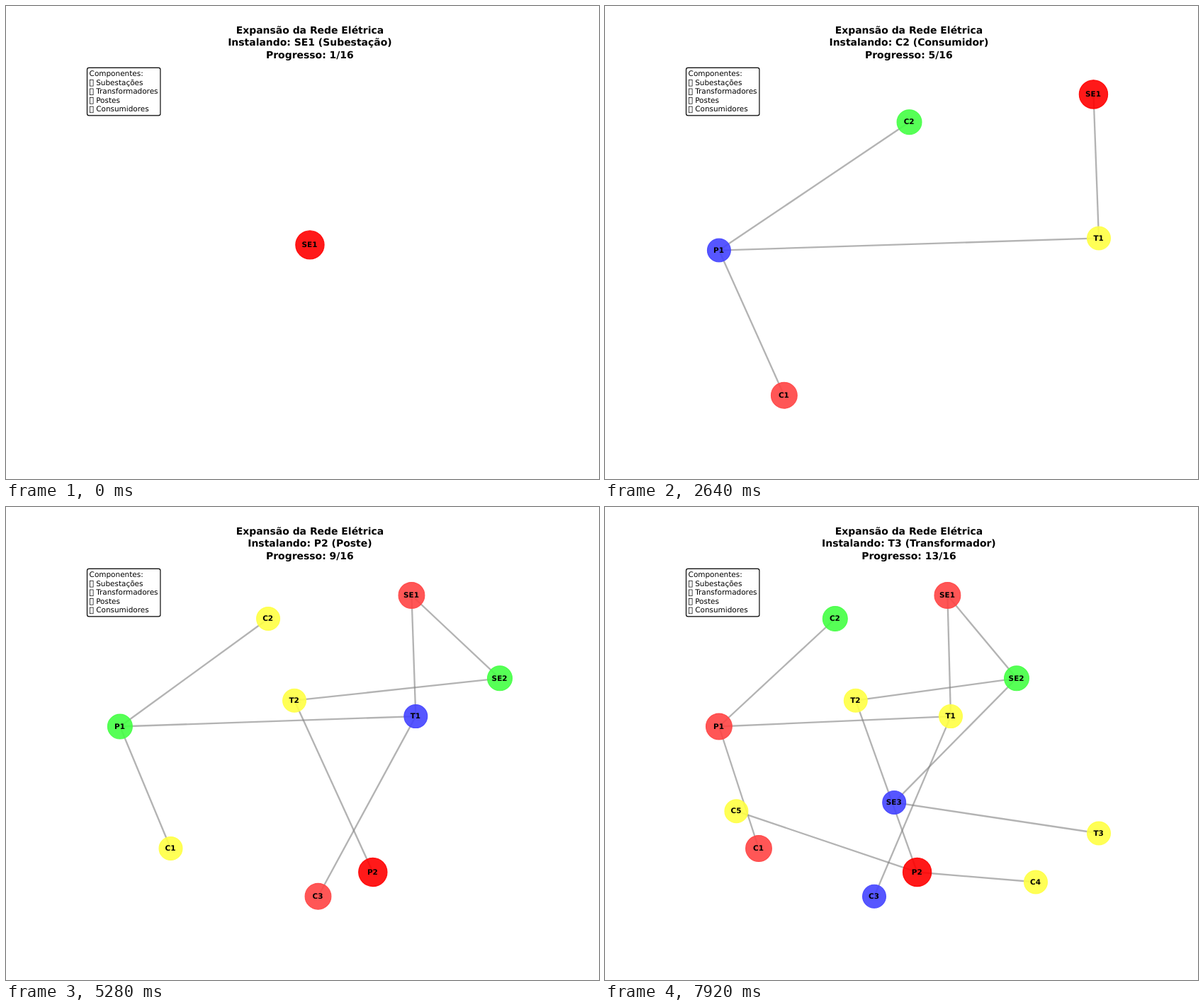
Write an HTML page that moves like this. It is 837 px wide and 669 px high and loops after 8 s.

```html
<!DOCTYPE html>
<html lang="pt">
<head>
<meta charset="utf-8">
<title>Expansão da Rede Elétrica</title>
<style>
html, body { margin: 0; width: 100%; height: 100%; overflow: hidden; background: #fff; }
svg { display: block; width: 100%; height: 100%; }
text { font-family: "DejaVu Sans", sans-serif; font-size: 10.46px; text-rendering: geometricPrecision; white-space: pre; }
.title text { font-size: 13.95px; font-weight: bold; text-anchor: middle; }
.labels text { font-weight: bold; text-anchor: middle; }
.edges line { stroke: #808080; stroke-opacity: .6; stroke-width: 2.32; }
.nodes circle { fill-opacity: .9; stroke-opacity: .9; stroke-width: 1.16; }
</style>
</head>
<body>
<svg viewBox="0 0 837 669">
  <g class="edges"></g>
  <g class="nodes"></g>
  <g class="labels"></g>
  <g class="legend">
    <rect x="114.5" y="87.4" width="103.4" height="67.4" rx="2.6" fill="#fff" stroke="#000" stroke-width="1.16"/>
  </g>
  <g class="title"></g>
</svg>
<script>
const STEP = 660, LOOP = 8000, TOTAL = 16;
const BOX = { left: 160.9, right: 697, top: 125, bottom: 550.7 };

// Installation order: name, parent, x, y
const parts = [
  ["SE1", null, 483.4, 125], ["T1", "SE1", 488, 296.1], ["P1", "T1", 160.9, 310.5],
  ["C1", "P1", 217, 483], ["C2", "P1", 324.8, 158], ["C3", "T1", 380, 550.7],
  ["SE2", "SE1", 581, 242.3], ["T2", "SE2", 353.8, 273.7], ["P2", "T2", 440.6, 516.5],
  ["C4", "P2", 608, 530.5], ["C5", "P2", 185.4, 430.2], ["SE3", "SE2", 408.2, 417.9],
  ["T3", "SE3", 697, 461.5]
].map(([name, parent, x, y]) => ({ name, parent, x, y, kind: name.replace(/\d/, "") }));

const kinds = {
  SE: { label: "Subestação", color: "#ff4444", size: 1000 },
  T: { label: "Transformador", color: "#44ff44", size: 900 },
  P: { label: "Poste", color: "#4444ff", size: 800 },
  C: { label: "Consumidor", color: "#ffff44", size: 800 }
};
const newest = { color: "#ff0000", size: 1200 };

// Styles follow installation order but are dealt out in these node orders.
const smallOrder = "SE1 C1 P1 T1".split(" ");
const midOrder = "C1 C2 P1 T1 C3 SE1 SE2".split(" ");
const fullOrder = "SE1 SE2 SE3 T1 T2 T3 C1 C2 C3 C4 C5 P1 P2".split(" ");

const $ = s => document.querySelector(s);
const edges = $(".edges"), nodes = $(".nodes"), labels = $(".labels"), title = $(".title"), legend = $(".legend");

function add(parent, tag, attrs, text) {
  const el = document.createElementNS("http://www.w3.org/2000/svg", tag);
  for (const key in attrs) el.setAttribute(key, attrs[key]);
  if (text) el.textContent = text;
  parent.appendChild(el);
}

// Map values so that their range fills [lo, hi]; a single value is centred.
function fit(values, lo, hi) {
  const min = Math.min(...values), span = Math.max(...values) - min;
  return v => span ? lo + (v - min) / span * (hi - lo) : (lo + hi) / 2;
}

function drawLegend() {
  ["Componentes:", "Subestações", "Transformadores", "Postes", "Consumidores"].forEach((text, i) => {
    const y = 99 + i * 12.55;
    if (i) add(legend, "rect", { x: 118.4, y: y - 7.1, width: 4.7, height: 8.7, fill: "none", stroke: "#000", "stroke-width": .7 });
    add(legend, "text", { x: i ? 127.2 : 117.6, y }, text);
  });
}

function draw(count) {
  const shown = parts.slice(0, count), last = shown[count - 1];
  const sx = fit(shown.map(p => p.x), BOX.left, BOX.right);
  const sy = fit(shown.map(p => p.y), BOX.top, BOX.bottom);
  const at = {};
  for (const p of shown) at[p.name] = { x: sx(p.x), y: sy(p.y) };
  [edges, nodes, labels, title].forEach(g => g.replaceChildren());

  for (const p of shown) {
    if (!p.parent) continue;
    const a = at[p.parent], b = at[p.name];
    add(edges, "line", { x1: a.x, y1: a.y, x2: b.x, y2: b.y });
  }

  const order = count < 5 ? smallOrder : count < 8 ? midOrder : fullOrder;
  order.filter(name => at[name]).forEach((name, i) => {
    const style = i === count - 1 ? newest : kinds[shown[i].kind];
    const { x, y } = at[name];
    const r = Math.sqrt(style.size) / 2 * 1.1625;
    add(nodes, "circle", { cx: x, cy: y, r, fill: style.color, stroke: style.color });
    add(labels, "text", { x: x - .4, y: y + 3.2 }, name);
  });

  ["Expansão da Rede Elétrica",
   `Instalando: ${last.name} (${kinds[last.kind].label})`,
   `Progresso: ${count}/${TOTAL}`
  ].forEach((text, i) => add(title, "text", { x: 428.9, y: 38.6 + i * 17.45 }, text));
}

let current = 0;
const start = performance.now();
function tick() {
  const t = (performance.now() - start) % LOOP;
  const count = Math.min(parts.length, Math.floor(t / STEP) + 1);
  if (count !== current) draw(current = count);
  requestAnimationFrame(tick);
}

drawLegend();
tick();
</script>
</body>
</html>
```
